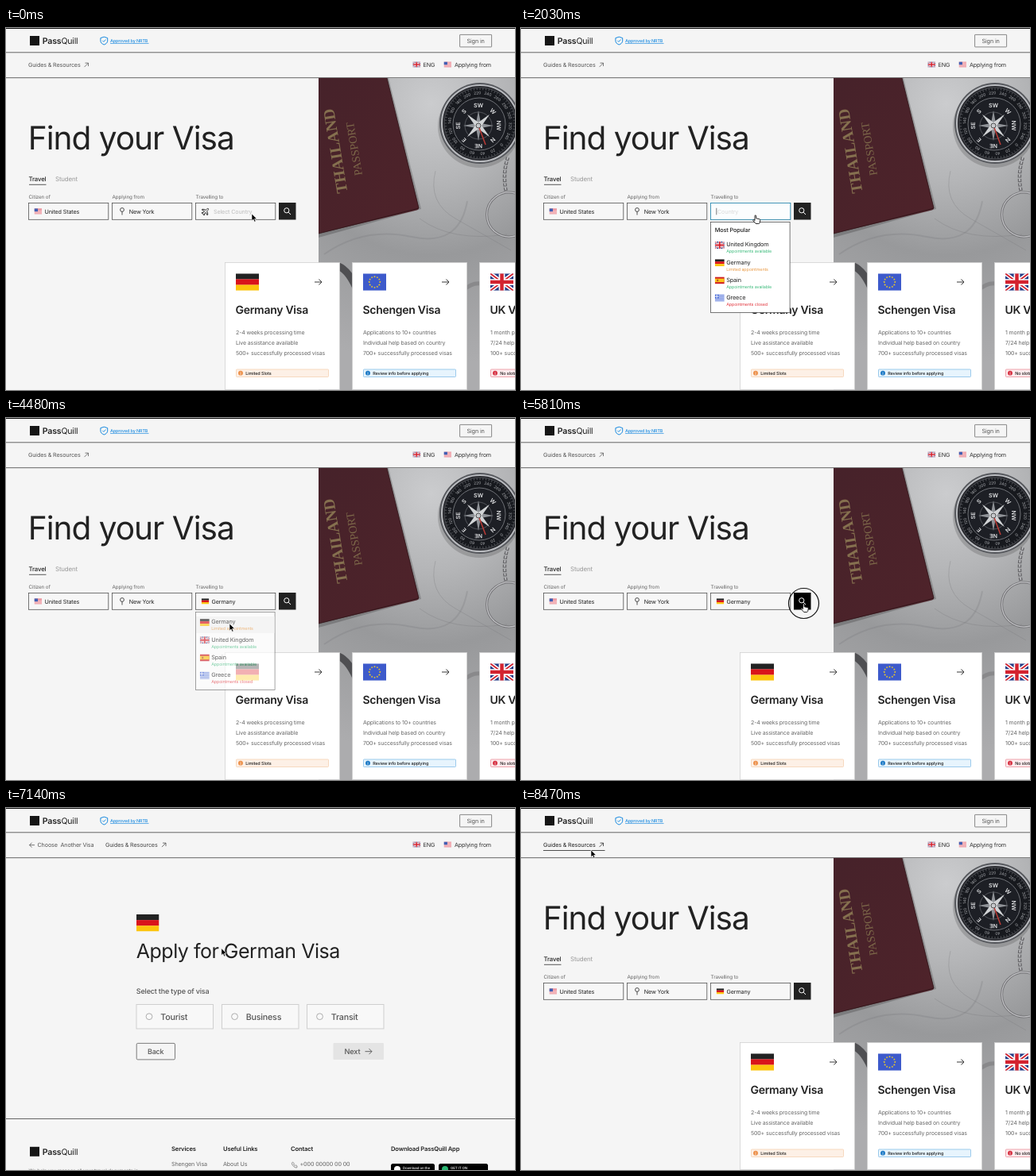
Write an HTML page that moves like this. It is 640 px wide and 456 px high and loops after 8.54 s.

```html
<!DOCTYPE html>
<html lang="en">
<head>
<meta charset="utf-8">
<title>Visa finder</title>
<style>
  html, body { margin: 0; width: 100%; height: 100%; overflow: hidden; background: #f5f5f5; }
  svg#stage { display: block; width: 100vw; height: 100vh; }
  text { font-family: Inter, sans-serif; letter-spacing: -.02em; text-rendering: geometricPrecision; white-space: pre; }
  .serif { font-family: "Liberation Serif", serif; letter-spacing: 0; }
  .dial text { letter-spacing: 0; }
</style>
</head>
<body>
<svg id="stage" viewBox="0 0 640 456"></svg>
<script>
const LOOP = 8540, TICK = 70;
const INK = '#222', GRAY = '#666', LINE = '#555';
const GREEN = '#3dbb7c', ORANGE = '#ea9a45', RED = '#e2373f', BLUE = '#1689e0';
const stage = document.getElementById('stage');

// ---- drawing helpers ----
const text = (x, y, size, str, fill = INK, weight = 400, more = '') =>
  `<text x="${x}" y="${y}" font-size="${size}" fill="${fill}" font-weight="${weight}" ${more}>${str}</text>`;
const rect = (x, y, w, h, fill, stroke = 'none', more = '') =>
  `<rect x="${x}" y="${y}" width="${w}" height="${h}" fill="${fill}" stroke="${stroke}" ${more}/>`;
const path = (d, stroke, width = 1, fill = 'none', more = '') =>
  `<path d="${d}" stroke="${stroke}" stroke-width="${width}" fill="${fill}" ${more}/>`;
const circle = (x, y, r, fill, stroke = 'none', width = 1, more = '') =>
  `<circle cx="${x}" cy="${y}" r="${r}" fill="${fill}" stroke="${stroke}" stroke-width="${width}" ${more}/>`;
const group = (id, body) => `<g id="${id}">${body}</g>`;
const flag = (name, x, y, w, h) => `<use href="#${name}" x="${x}" y="${y}" width="${w}" height="${h}"/>`;
const repeat = (n, fn) => Array.from({ length: n }, (_, i) => fn(i)).join('');
const middle = 'text-anchor="middle"';
const thin = 'stroke-width=".75"';
const arrowRight = (x, y, color, w = 9) =>
  path(`M${x} ${y}h${w}m-3.5 -3.5l3.5 3.5l-3.5 3.5`, color, .9);
const arrowUp = (x, y, color) => path(`M${x} ${y}l5 -5m-4 0h4v4`, color, .75);

// ---- flags, all on a 30 x 22 field ----
const symbol = (id, body) =>
  `<symbol id="${id}" viewBox="0 0 30 22" preserveAspectRatio="none">${body}</symbol>`;
const star = (x, y, r) => {
  const pts = Array.from({ length: 10 }, (_, i) => {
    const a = i * Math.PI / 5, k = i % 2 ? r * .42 : r;
    return `${x + k * Math.sin(a)},${y - k * Math.cos(a)}`;
  });
  return `<polygon points="${pts.join(' ')}" fill="#f8d21c"/>`;
};
const flags =
  symbol('de', rect(0, 0, 30, 7.4, INK) + rect(0, 7.3, 30, 7.4, '#d9141b') + rect(0, 14.6, 30, 7.4, '#fcc40c')) +
  symbol('eu', rect(0, 0, 30, 22, '#3d5acb') +
    repeat(12, i => star(15 + 7 * Math.sin(i * Math.PI / 6), 11 - 7 * Math.cos(i * Math.PI / 6), 1.5))) +
  symbol('uk', rect(0, 0, 30, 22, '#243c86') +
    path('M0 0L30 22M30 0L0 22', '#fff', 5) + path('M0 0L30 22M30 0L0 22', '#d3222f', 1.8) +
    path('M15 0V22M0 11H30', '#fff', 8) + path('M15 0V22M0 11H30', '#d3222f', 4.6)) +
  symbol('us', rect(0, 0, 30, 22, '#fff') +
    repeat(7, i => rect(0, i * 22 / 6.5, 30, 22 / 13, '#dc4453')) + rect(0, 0, 14, 11.8, '#3f5fb4')) +
  symbol('es', rect(0, 0, 30, 22, '#cf1f26') + rect(0, 5.5, 30, 11, '#fbc41a') + rect(6, 8, 5, 6, '#b5552a')) +
  symbol('gr', rect(0, 0, 30, 22, '#fff') +
    repeat(5, i => rect(0, i * 22 / 4.5, 30, 22 / 9, '#3f63d6')) +
    rect(0, 0, 12, 12.2, '#3f63d6') + path('M6 0V12.2M0 6.1H12', '#fff', 2.4));

// ---- shared header ----
const logo = y => rect(30, y + 1.5, 12, 12, '#161616') +
  text(45.8, y + 11.7, 10.6, '<tspan font-weight="600">Pass</tspan>Quill');

const header = rect(0, 0, 640, 456, '#f5f5f5') + rect(0, 0, 640, 1, '#111') + logo(8.5) +
  path('M123.3 11.2l4.4 1.4v3.6c0 2.4 -2 3.9 -4.4 4.8c-2.4 -.9 -4.4 -2.4 -4.4 -4.8v-3.6z', BLUE) +
  path('M121.3 15.9l1.5 1.5l2.7 -2.9', BLUE, .9) +
  text(131, 17.9, 5.4, 'Approved by NRTB', BLUE, 500) + path('M131 19.4H179.5', BLUE, .7) +
  rect(570.6, 8.4, 40, 15.5, 'none', '#666', `rx=".5" ${thin}`) + text(590.6, 18.9, 7.3, 'Sign in', LINE, 400, middle) +
  path('M0 30.8H640M0 62.7H640', LINE, .9) +
  flag('uk', 511.5, 42.5, 9.5, 7) + text(524.5, 48.7, 7.2, 'ENG', '#333') +
  flag('us', 550.5, 42.5, 9.5, 7) + text(564, 48.7, 7.2, 'Applying from', '#333');

// ---- photo: passport, compass and key ring on marble ----
const dialMarks = ['SW', 'W', 'NW', 'N', 'NE', 'E', 'SE', 'S'];
const turned = a => `transform="rotate(${a})"`;
const spike = (a, r, w, fill) => path(`M0 ${-r}L${w} ${-w}L0 0L${-w} ${-w}z`, 'none', 0, fill, turned(a));
const compass = '<g transform="translate(596 120)" class="dial">' +
  circle(-1, 4, 52, '#000', 'none', 0, 'opacity=".16"') +
  circle(0, 0, 51, '#55575c') + circle(0, 0, 48, '#26272c', '#b9bbbf', 2) +
  circle(0, 0, 45, '#17191e', '#55575c', .8) +
  repeat(72, i => path('M0 -44.5V-42', '#9a9ca0', .4, 'none', turned(i * 5))) +
  repeat(18, i => text(0, -36.5, 5, i * 20, '#a6a8ac', 400, `${middle} ${turned(i * 20 - 225)}`)) +
  circle(-1, 1, 33, '#1d1f25', '#85878c', .8) +
  '<g transform="translate(-2 3)">' +
  dialMarks.map((m, i) => text(0, -23, 7.2, m, '#e2e3e5', 600, `${middle} ${turned(i * 45)}`)).join('') +
  circle(0, 0, 17, 'none', '#777a80', .6) +
  repeat(4, i => spike(i * 90, 19, 3, '#8f9297')) + repeat(4, i => spike(i * 90 + 45, 20, 3, '#d2d4d6')) +
  path('M0 0L9 24', '#b93a35', 1.6) + circle(0, 0, 3, '#c9cbce', '#333', .8) + '</g></g>';

const ring = 'M640 208A28 28 0 1 0 640 262', chain = 'M631 163Q624 184 629 207';
const photo = rect(393, 63, 247, 393, 'url(#marble)') +
  path('M400 285q50 -35 110 -22t70 -45', '#6f6f72', 2, 'none', 'opacity=".22"') +
  path('M540 180q-10 40 25 60t70 40M520 240q40 30 110 20', '#747477', 1, 'none', 'opacity=".3"') +
  path('M418 300q14 6 24 32', '#4f4f52', 9) + path('M576 330q10 -10 22 -8', '#68686b', 5, 'none', 'opacity=".4"') +
  path('M393 63H481L522 228L393 264z', 'none', 0, '#000', 'opacity=".2"') +
  path('M393 63H479L519 226Q519.5 228.5 517 229.3L393 259z', 'none', 0, 'url(#cover)') +
  path('M479 63L519 227L393 259', '#2f1519', .8) +
  text(0, 0, 20, 'THAILAND', '#85704f', 700, 'class="serif" transform="translate(429.5 207) rotate(-99.4)"') +
  text(0, 0, 14.2, 'PASSPORT', '#7c6749', 400, 'class="serif" transform="translate(448 185) rotate(-99.4)"') +
  compass +
  path(chain, '#6a6a6d', 4.5, 'none', 'stroke-dasharray="4 1.5"') + path(chain, '#c4c4c7', 1.5, 'none', 'stroke-dasharray="3 2.5"') +
  path(ring, '#707073', 3) + path(ring, '#c2c2c5', 1.3);

// ---- cards ----
const card = (x, country, title, lines, [badge, ink, tint, edge]) =>
  rect(x + .5, 295.5, 144, 160, '#fff', '#cfcfcf', thin) + flag(country, x + 14, 309.3, 29, 21.5) +
  arrowRight(x + 113, 320, INK) + text(x + 13.5, 359.5, 14, title, INK, 600) +
  lines.map((l, i) => text(x + 14, 385.6 + i * 13.4, 7, l, GRAY)).join('') +
  rect(x + 14.5, 430, 116, 9.5, tint, edge, `${thin} rx=".8"`) +
  circle(x + 20, 434.7, 2.9, ink) + path(`M${x + 20} 433v.8m0 .8v2`, '#fff', .8) +
  text(x + 26.2, 436.7, 5.5, badge, INK, 500);

const cards =
  card(275, 'de', 'Germany Visa', ['2-4 weeks processing time', 'Live assistance available', '500+ successfully processed visas'],
    ['Limited Slots', '#ec8d45', '#fdf0e6', '#f5cfae']) +
  card(435, 'eu', 'Schengen Visa', ['Applications to 10+ countries', 'Individual help based on country', '700+ successfully processed visas'],
    ['Review info before applying', '#1676c4', '#e7f4fd', '#7fbbe6']) +
  card(595, 'uk', 'UK Visa', ['1 month processing time', '7/24 help available', '100+ successfully processed visas'],
    ['No slots available', '#d52b3c', '#fdeaec', '#e88a94']);

// ---- search form ----
const box = (x, fill, stroke) => rect(x, 220.6, 100.2, 20.7, fill, stroke, thin);
const field = (x, label) => text(x, 215.2, 6.3, label, GRAY) + box(x, '#f7f7f7', '#4a4a4a');
const value = (x, str, fill = INK) => text(x, 233.7, 7.2, str, fill);
const plane = path('M0 -4.8q1 0 1 2v1.3l3.8 2.3v1.2l-3.8 -1v2.2l1.2 1v.8l-2.2 -.5l-2.2 .5v-.8l1.2 -1v-2.2l-3.8 1v-1.2l3.8 -2.3v-1.3q0 -2 1 -2z',
  INK, .9, 'none', 'transform="translate(251 231) rotate(45)"');

const form = text(28.5, 193.4, 7.8, 'Travel', INK, 500) + path('M29 197.3H50.5', INK, .75) +
  text(62, 193.4, 7.9, 'Student', '#999') +
  field(28.6, 'Citizen of') + flag('us', 35.5, 227.3, 9.7, 7.2) + value(48.5, 'United States') +
  field(133.6, 'Applying from') + circle(146, 229, 2.4, 'none', INK, .8) + path('M146 231.4V235.5', INK, .8) + value(154.8, 'New York') +
  field(238.6, 'Travelling to') +
  group('empty', plane + value(261, 'Select Country', '#bdbdbd')) +
  group('chosen', flag('de', 245.7, 227.3, 9.6, 7.2) + value(258.5, 'Germany')) +
  group('focused', box(238.6, '#fbfdfe', '#2190bd') +
    group('ghost', value(247, 'Country', '#dadada')) +
    text(245.5, 233.7, 7.2, '', INK, 400, 'id="typed"') + rect(245.5, 226.8, .7, 8.5, '#444', 'none', 'id="caret"')) +
  rect(343, 220, 21.5, 21.5, INK, 'none', 'id="search"') +
  circle(352.8, 229.8, 3.1, 'none', '#fff') + path('M355.2 232.2L358 235', '#fff');

// ---- country menus ----
const countries = {
  uk: ['United Kingdom', 'Appointments available', GREEN],
  de: ['Germany', 'Limited appointments', ORANGE],
  es: ['Spain', 'Appointments available', GREEN],
  gr: ['Greece', 'Appointments closed', RED]
};
const menu = (id, order, first, bottom, top) => group(id,
  rect(238.6, 244.5, 99.5, bottom - 244.5, '#fff', '#4a4a4a', thin) + top +
  order.map((code, i) => {
    const y = first + i * 22.2, [name, note, color] = countries[code];
    return flag(code, 243.8, y - 6.3, 12, 9) + text(258.2, y, 7.3, name) + text(258.2, y + 8, 5.4, note, color);
  }).join(''));

const home = group('home', photo + text(27.8, 153, 40.6, 'Find your Visa', INK, 400, 'style="letter-spacing:-.025em"') +
  group('guides', text(28, 49.4, 7.2, 'Guides &amp; Resources', 'currentColor') + arrowUp(98.5, 49.1, 'currentColor')) +
  path('M28 53.5H105.5', INK, .8, 'none', 'id="guidesLine"') +
  form + cards +
  menu('popular', ['uk', 'de', 'es', 'gr'], 275.3, 358.5, text(243.8, 257.3, 7.3, 'Most Popular', INK, 500)) +
  menu('matches', ['de', 'uk', 'es', 'gr'], 259.4, 342.5, rect(239, 250, 98.5, 21, '#f4f4f4')));

// ---- application page ----
const option = (x, label) => rect(x, 247.5, 96.5, 30.5, '#f8f8f8', '#cfcfcf') +
  circle(x + 16, 262.7, 3.9, '#fafafa', '#9a9a9a', .8) + text(x + 30.3, 266.6, 10.7, label, LINE, 500);
const column = (x, title, entry, shift = 0) => text(x, 432.3, 7.6, title, INK, 600) + text(x + shift, 450.6, 7.2, entry, GRAY);
const store = (x, w, label, dot) => rect(x, 448, w, 17, '#000', 'none', 'rx="2.5"') +
  circle(x + 8, 455, 4, dot) + text(x + 15, 455, 4.4, label, '#fff', 500);

const apply = group('apply',
  group('back', path('M36 46.7H29.5m3 -3l-3 3l3 3', 'currentColor', .8) +
    text(39.5, 49.4, 7.2, 'Choose  Another Visa', 'currentColor')) +
  path('M28.5 53.7H112', INK, .8, 'none', 'id="backLine"') +
  text(125, 49.4, 7.2, 'Guides &amp; Resources', '#444') + arrowUp(196, 49.1, '#444') +
  flag('de', 164, 134, 28.5, 21.5) + text(163.8, 188.5, 25, 'Apply for German Visa') +
  text(163.8, 233.9, 9, 'Select the type of visa', LINE, 500) +
  option(164, 'Tourist') + option(271.5, 'Business') + option(378.5, 'Transit') +
  rect(164.2, 296.4, 48.3, 20.5, 'none', LINE, `rx="1.5" ${thin}`) + text(188.2, 310, 9, 'Back', LINE, 500, middle) +
  rect(411.5, 296, 63.5, 21, '#e4e4e4', 'none', 'rx="1"') + text(425.5, 310, 9.2, 'Next', LINE, 500) + arrowRight(451.5, 306.7, LINE, 8.5) +
  path('M0 391.5H640', LINE, .9) + logo(425.3) +
  text(28.5, 458.5, 6.2, 'We help you manage all your travel documents in', GRAY) +
  column(208, 'Services', 'Shengen Visa') + column(273, 'Useful Links', 'About Us') +
  column(358, 'Contact', '+000 00000 00 00', 11.5) +
  path('M360.5 446q-2 1 -.5 3.5t4 3.5t2 -2l-1.5 -1.2l-1.3 .8q-1.2 -.8 -1.5 -1.8l.8 -1z', GRAY, .7) +
  text(484, 432.3, 7.6, 'Download PassQuill App', INK, 600) +
  store(484, 55, 'Download on the', '#fff') + store(544, 62, 'GET IT ON', '#2bb673'));

// ---- pointer ----
const pointer = group('pointer',
  circle(0, -.5, 19, 'none', '#111', 1.2, 'id="ring"') +
  path('M0 0V8.8L2 7L3.5 10.2L5 9.5L3.6 6.5L6.3 6.3z', '#fff', .6, '#000', 'id="arrow"') +
  path('M-1 .3q1 -.9 1.7 .2v3.3l4.2 .9q1 .4 .8 1.6l-.6 3.2q-.3 1 -1.3 1h-3.6l-3.4 -4q-.3 -1 .8 -1l1.4 1z', '#111', .9, '#fff', 'id="hand"'));

stage.innerHTML = `<defs>${flags}
  <radialGradient id="marble" gradientUnits="userSpaceOnUse" cx="535" cy="95" r="330">
    <stop stop-color="#cbccce"/><stop offset=".3" stop-color="#b4b5b7"/>
    <stop offset=".58" stop-color="#98999b"/><stop offset="1" stop-color="#acacae"/></radialGradient>
  <linearGradient id="cover" x1="0" y1="0" x2="1" y2="1"><stop stop-color="#46222a"/><stop offset="1" stop-color="#4f232a"/></linearGradient>
  </defs>` + header + home + apply + pointer;

// ---- timeline ----
const part = Object.fromEntries([...stage.querySelectorAll('[id]')].map(n => [n.id, n]));
const within = (t, a, b) => t >= a && t < b;
const show = (id, on) => part[id].setAttribute('opacity', +on);
const clamp = v => Math.max(0, Math.min(1, v));
const ease = p => p * p * (3 - 2 * p);

// start, end, from, to
const moves = [
  [630, 980, [309, 234], [295, 236]],
  [2030, 2660, [295, 236], [273, 229]],
  [3500, 3920, [273, 229], [281, 259]],
  [5320, 5740, [281, 259], [355.5, 234]],
  [6930, 7490, [355.5, 234], [88, 53]]
];
const clicks = [[1190, 1260], [2940, 3080], [4340, 4410], [5810, 5880], [7770, 7910]];
const handTimes = [[840, 2170], [3710, 4480], [5670, 5880]];
const keys = [[3360, 'Ger'], [3220, 'Ge'], [3150, 'G'], [0, '']];

function pointerAt(t) {
  const [a, b, from, to] = moves.filter(m => t >= m[0]).pop() || moves[0];
  const p = ease(clamp((t - a) / (b - a)));
  return from.map((v, i) => v + (to[i] - v) * p);
}

function draw(t) {
  const onApply = within(t, 5880, 8260);
  part.home.style.display = onApply ? 'none' : '';
  part.apply.style.display = onApply ? '' : 'none';

  const typed = keys.find(k => t >= k[0])[1];
  show('empty', t < 1540);
  show('focused', within(t, 1540, 4480));
  show('chosen', t >= 4480);
  show('ghost', !typed);
  part.typed.textContent = typed;
  part.caret.setAttribute('x', 245.5 + (typed ? part.typed.getComputedTextLength() + .6 : 0));
  show('popular', t < 3150 ? clamp((t - 1470) / 280) : 0);
  show('matches', t < 3150 ? 0 : clamp(1 - (t - 4410) / 210));
  part.search.setAttribute('fill', within(t, 5670, 5880) ? '#000' : INK);

  const hoverBack = t >= 7420, hoverGuides = t >= 8260;
  show('backLine', hoverBack);
  part.back.style.color = hoverBack ? INK : LINE;
  show('guidesLine', hoverGuides);
  part.guides.style.color = hoverGuides ? INK : LINE;

  const isHand = handTimes.some(h => within(t, ...h));
  show('hand', isHand);
  show('arrow', !isHand);
  show('ring', clicks.some(c => within(t, ...c)));
  part.pointer.setAttribute('transform', `translate(${pointerAt(t)})`);
}

function frame() {
  const t = performance.now() % LOOP;
  draw(Math.floor(t / TICK) * TICK);
  requestAnimationFrame(frame);
}
frame();
</script>
</body>
</html>
```
